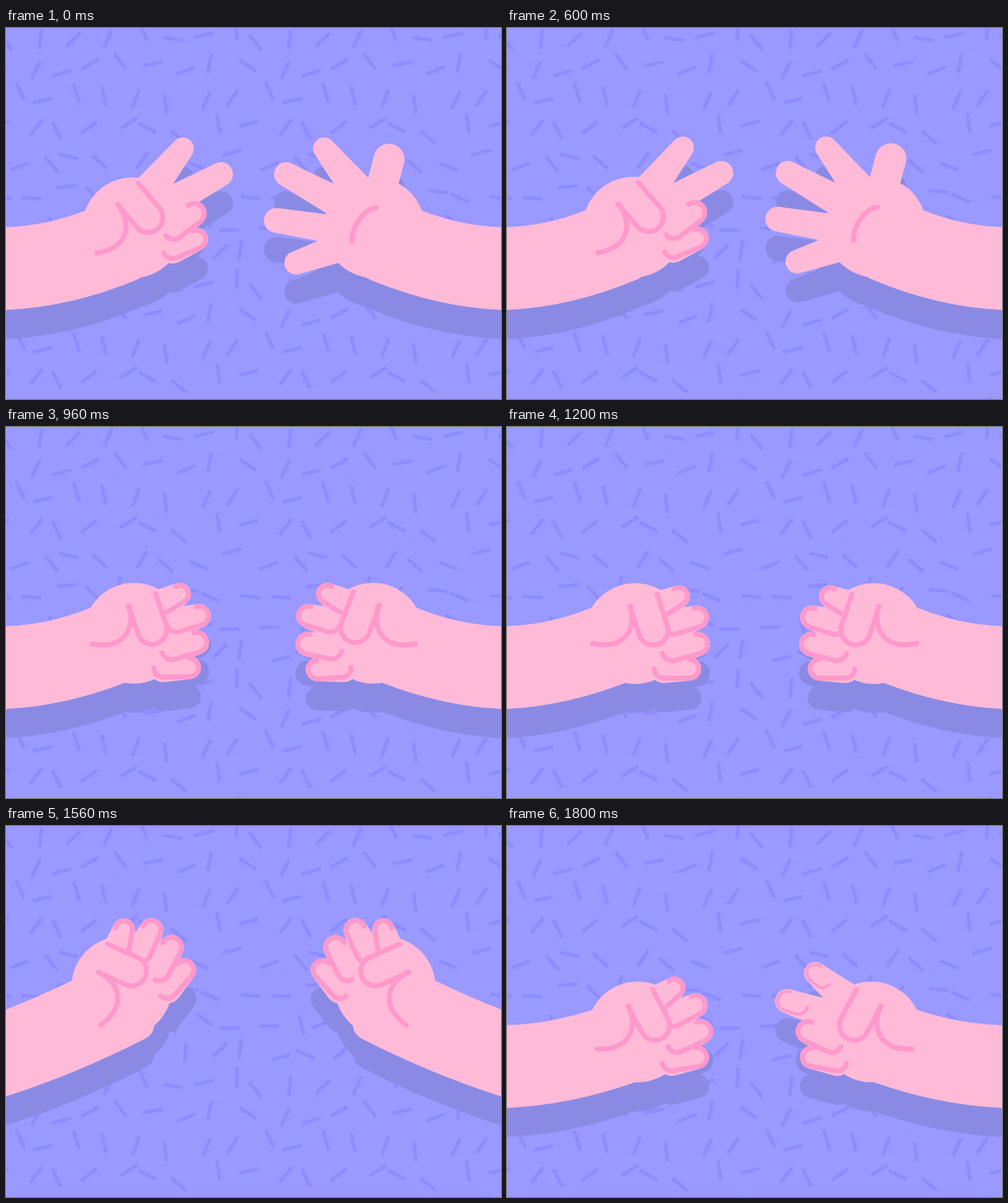
Recreate the animation shown at these times as an HTML page with a canvas. Size 800 by 600 pixels, loop 1.84 s.

```html
<!DOCTYPE html>
<html>
<head>
<meta charset="utf-8">
<style>
html, body { margin: 0; width: 100%; height: 100%; overflow: hidden; background: #9999ff; }
canvas { display: block; }
</style>
</head>
<body>
<canvas id="stage" width="800" height="600"></canvas>
<script>
const ctx = document.getElementById('stage').getContext('2d');
const SKIN = '#ffbad8', LINE = '#ff99cc', SHADOW = '#8a8ae5';
const LOOP = 1840, STEP = 40, TILE = 403, CELLS = 8, PEN = 8, PALM = 81.5;
const { PI, sin, cos, min, hypot, atan2, acos } = Math;
const rad = deg => deg * PI / 180;
const lerp = (a, b, k) => a + (b - a) * k;

// Relative to the palm centre: knuckle and its radius, fingertip centre
// when folded and when open, fingertip radius
const fingers = [
  { knuckle: [44, -43], base: 27, folded: [71, -60], open: [124, -87], tip: 18 },
  { knuckle: [62, -14], base: 25, folded: [100, -26], open: [165, -25], tip: 19.5 },
  { knuckle: [60, 28], base: 23, folded: [101, 17], open: [151, 50], tip: 20 },
  { knuckle: [46, 57], base: 23, folded: [88, 57], open: [95, 101], tip: 19 }
];

// Slopes shape the easing towards the next key; lead opens the right scissors early
const keys = [
  { t: 0, slopes: [3, 0], x: 204.6, y: 323, turn: -22.6, shoulder: 0, open: 1, lead: 0 },
  { t: 600, slopes: [0, 0.4], x: 204, y: 322, turn: -23, shoulder: 0, open: 1, lead: 0 },
  { t: 800, slopes: [3, 0], x: 207, y: 331.5, turn: -5, shoulder: 0, open: 0.36, lead: 0 },
  { t: 1200, slopes: [0, 1.5], x: 207, y: 334, turn: 0, shoulder: 0, open: 0, lead: 0 },
  { t: 1320, slopes: [3, 0], x: 199, y: 289, turn: -25.5, shoulder: -13, open: 0, lead: 0 },
  { t: 1560, slopes: [0, 2.6], x: 187.4, y: 260, turn: -48, shoulder: -22, open: 0, lead: 0 },
  { t: 1800, slopes: [1, 1], x: 211, y: 333, turn: -10, shoulder: 0, open: 0, lead: 0.66 }
];
keys.push({ ...keys[0], t: LOOP });

function poseAt(t) {
  const i = keys.findIndex(key => key.t > t);
  const from = keys[i - 1], to = keys[i];
  const u = (t - from.t) / (to.t - from.t), v = 1 - u, [s0, s1] = from.slopes;
  const k = s0 * u * v * v + u * u * (3 - 2 * u) - s1 * u * u * v;
  const pose = {};
  for (const name of ['x', 'y', 'turn', 'shoulder', 'open', 'lead'])
    pose[name] = lerp(from[name], to[name], k);
  return pose;
}

// Outlines fade as a finger stretches
function strokeLine(open) {
  const width = PEN * min(1, (1 - open) * 1.8);
  if (width < 0.1) return;
  ctx.strokeStyle = LINE;
  ctx.lineWidth = width;
  ctx.stroke();
}

// Runs paint(length) with the x axis pointing from knuckle to fingertip
function alongFinger({ knuckle: [kx, ky], folded, open }, amount, paint) {
  const dx = lerp(folded[0], open[0], amount) - kx;
  const dy = lerp(folded[1], open[1], amount) - ky;
  ctx.save();
  ctx.translate(kx, ky);
  ctx.rotate(atan2(dy, dx));
  ctx.beginPath();
  paint(hypot(dx, dy));
  ctx.restore();
}

function fillFinger(finger, amount) {
  alongFinger(finger, amount, length => {
    const a = acos((finger.base - finger.tip) / length);
    ctx.arc(0, 0, finger.base, a, -a);
    ctx.arc(length, 0, finger.tip, -a, a);
    ctx.fill();
  });
}

function outlineFinger(finger, amount) {
  const { knuckle: [kx, ky], folded: [fx, fy] } = finger;
  const r = finger.tip - PEN / 2;
  const bend = hypot(fx - kx, fy - ky) * (1 - 0.8 * amount);
  alongFinger(finger, amount, length => {
    ctx.arc(length, 0, r, -PI / 2, PI / 2);
    ctx.arc(length - bend, 0, r, PI / 2, PI);
    strokeLine(amount);
  });
}

// The thumb swings about its root from the palm to upright
function drawThumb(open, color, lined) {
  const shift = 32 * open * (1 - open), r = 24 - 3 * open;
  ctx.save();
  ctx.translate(13 - shift, -56 - shift);
  ctx.rotate(rad(72 - 154 * open ** 1.8));
  ctx.beginPath();
  ctx.moveTo(0, -r);
  ctx.arc(77 - r, 0, r, -PI / 2, PI / 2);
  ctx.lineTo(5, r);
  ctx.strokeStyle = color;
  ctx.lineWidth = PEN;
  ctx.fill();
  ctx.stroke();
  if (lined) strokeLine(open);
  ctx.restore();
}

function drawCrease(open) {
  ctx.beginPath();
  if (open > 0.7) {
    ctx.moveTo(10, -31);
    ctx.bezierCurveTo(27, -20, 35, 10, 25, 34);
  } else {
    ctx.moveTo(-7, -44);
    ctx.bezierCurveTo(2, 0, -22, 26, -69, 16);
  }
  strokeLine(0);
}

// The forearm runs from the stage edge to the wrist, which follows the palm's turn
function drawArm({ x, y, turn, shoulder }) {
  const top = 322 + shoulder * 1.15, bottom = 456 + shoulder * 0.85;
  const up = rad(31 + turn / 2), down = rad(-12 - turn * 0.75);
  const heel = 82 + 10 * (turn / 48) ** 2;
  const tx = x - PALM * cos(up), ty = y - PALM * sin(up);
  const bx = x + heel * sin(down), by = y + heel * cos(down);
  ctx.beginPath();
  ctx.moveTo(0, top);
  ctx.quadraticCurveTo(tx / 2, top - 2 + shoulder * 0.85, tx, ty);
  ctx.lineTo(x, y);
  ctx.lineTo(x + 52, y + 62);
  ctx.quadraticCurveTo(bx + 14, by - 8, bx, by);
  ctx.quadraticCurveTo(bx / 2, bottom - 5 + shoulder * 1.4, 0, bottom);
  ctx.fill();
  ctx.beginPath();
  ctx.arc(x, y, PALM, 0, 2 * PI);
  ctx.fill();
}

function drawHand(pose, right, shadow) {
  const pair = pose.open + (right ? pose.lead : 0);
  const rest = right ? pose.open : 0;
  const amount = i => i < 2 ? pair : rest;
  const color = shadow ? SHADOW : SKIN;
  ctx.save();
  if (right) { ctx.translate(800, 0); ctx.scale(-1, 1); }
  if (shadow) ctx.translate(0, 47);
  ctx.fillStyle = color;
  drawArm(pose);
  ctx.translate(pose.x, pose.y);
  ctx.rotate(rad(pose.turn));
  fingers.forEach((finger, i) => fillFinger(finger, amount(i)));
  if (!shadow) fingers.forEach((finger, i) => outlineFinger(finger, amount(i)));
  drawThumb(rest, color, !shadow);
  if (!shadow) drawCrease(rest);
  ctx.restore();
}

// Repeating confetti tile: one dash near the middle of each cell
function makeConfetti() {
  const path = new Path2D(), cell = TILE / CELLS;
  let seed = 7;
  const random = () => (seed = seed * 16807 % 2147483647) / 2147483647;
  for (let i = 0; i < CELLS * CELLS; i++) {
    const row = Math.floor(i / CELLS);
    const cx = (i % CELLS + row % 2 / 2 + random() * 0.5) * cell;
    const cy = (row + random() * 0.5) * cell;
    const angle = random() * PI, dx = 16 * cos(angle), dy = 16 * sin(angle);
    for (let x = cx - TILE; x < 820; x += TILE)
      for (let y = cy - TILE; y < 620; y += TILE) {
        path.moveTo(x - dx, y - dy);
        path.lineTo(x + dx, y + dy);
      }
  }
  return path;
}
const confetti = makeConfetti();

function draw(time) {
  const pose = poseAt(Math.floor(time % LOOP / STEP) * STEP);
  ctx.fillStyle = '#9999ff';
  ctx.fillRect(0, 0, 800, 600);
  ctx.lineCap = 'butt';
  ctx.strokeStyle = '#8c8cff';
  ctx.lineWidth = 5.5;
  ctx.stroke(confetti);
  ctx.lineCap = ctx.lineJoin = 'round';
  for (const shadow of [true, false])
    for (const right of [false, true]) drawHand(pose, right, shadow);
}

const begin = performance.now();
function tick() {
  draw(performance.now() - begin);
  requestAnimationFrame(tick);
}
tick();
</script>
</body>
</html>
```
